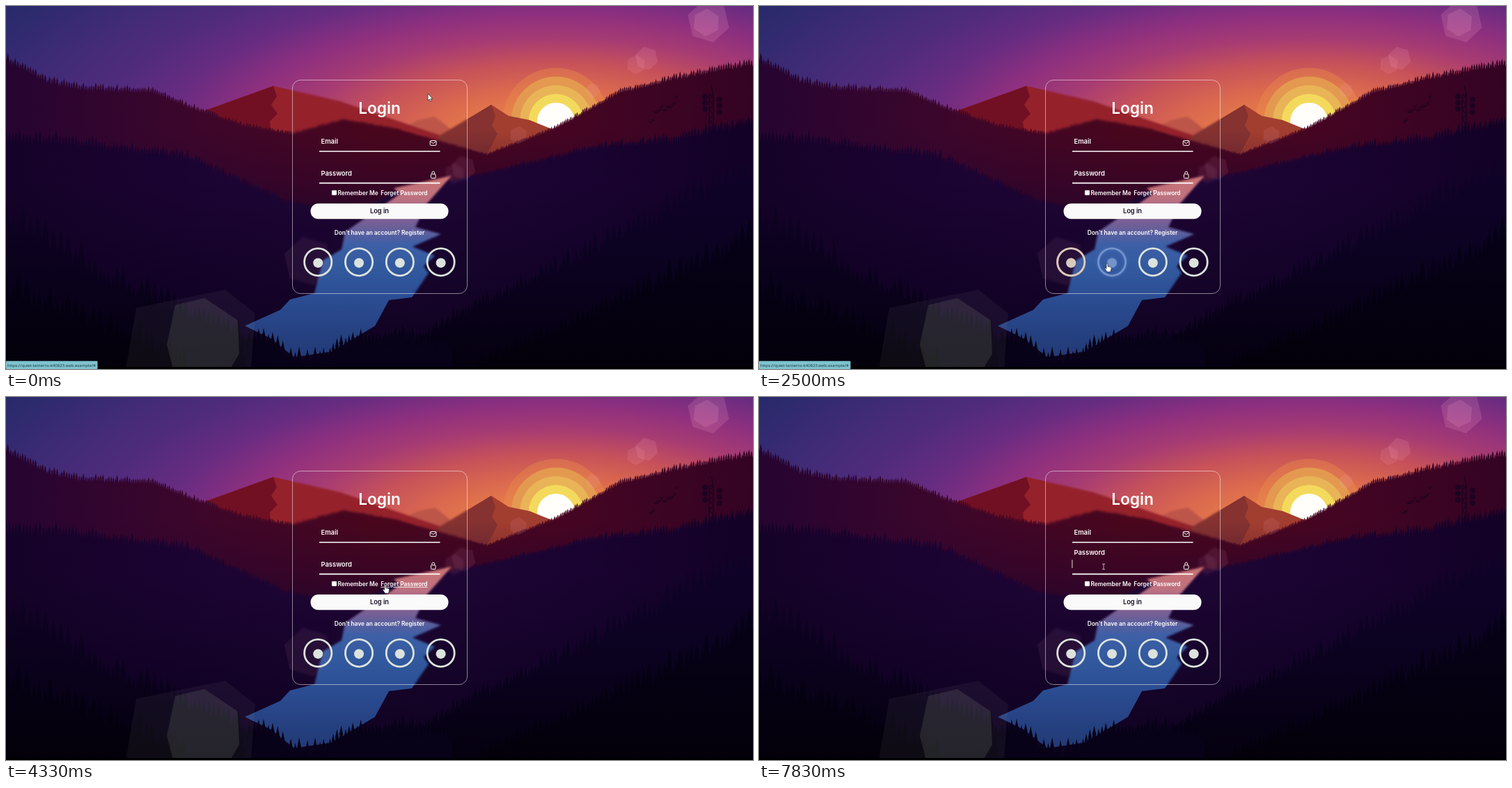
An HTML page with a canvas that plays this animation: 1073x522 px, repeating every 8000 ms.

```html
<!DOCTYPE html>
<html lang="en">
<head>
<meta charset="utf-8">
<title>Login</title>
<style>
  html, body { margin: 0; width: 100%; height: 100%; overflow: hidden; background: #05010f; }
  canvas, svg, #card { position: absolute; left: 0; top: 0; }
  #card {
    left: 410.5px; top: 106px; width: 250px; height: 306px;
    border: 1px solid rgba(255, 255, 255, .5); border-radius: 12px;
    backdrop-filter: blur(1.5px);
  }
  text { font-family: Inter, "Open Sans", sans-serif; font-weight: 600; fill: #fff; }
  .label { font-size: 9.4px; }
  .small { font-size: 8.3px; }
  .line { fill: none; stroke: #fff; }
</style>
</head>
<body>
<canvas id="scene" width="1073" height="522"></canvas>
<div id="card"></div>
<svg width="1073" height="522" viewBox="0 0 1073 522">
  <text x="536.5" y="155" font-size="22.7" text-anchor="middle">Login</text>

  <text id="email" class="label" x="452.5" y="198">Email</text>
  <text id="password" class="label" x="452.5" y="243.7">Password</text>
  <path class="line" stroke-width="1.6" d="M450 209H623.5M450 254.6H623.5"/>
  <rect class="line" x="609.2" y="193.6" width="8.8" height="6.8" rx="1"/>
  <path class="line" d="M609.6 194.6l4 3 4-3"/>
  <rect class="line" x="610.4" y="241.8" width="6.6" height="5.8" rx="1"/>
  <path class="line" d="M611.8 241.5v-1.6a1.9 1.9 0 0 1 3.8 0v1.6"/>
  <path id="caret" class="line" style="stroke:#e5dfc4" d="M449.9 234v12"/>

  <rect x="468" y="265" width="7" height="7" rx="1" fill="#fff" stroke="#8a7f88" stroke-width=".5"/>
  <text class="small" x="476.5" y="272">Remember Me</text>
  <text id="forget" class="small" x="538.3" y="272">Forget Password</text>
  <rect x="437.5" y="284" width="198" height="22.3" rx="11.1" fill="#fafafa"/>
  <text x="536.5" y="298.3" font-size="9.2" text-anchor="middle" style="fill:#140b20">Log in</text>
  <text class="small" x="536.5" y="328.8" text-anchor="middle">Don't have an account? Register</text>

  <g id="icons"></g>

  <g id="status">
    <rect y="510.5" width="131.5" height="11.5" rx="1" fill="#7fc3cf"/>
    <text x="2" y="518.8" font-size="6" style="font-family:'Open Sans',sans-serif;font-weight:400;fill:#16323a">https://quiet-lanterns-k40823.web.example/#</text>
  </g>

  <g id="cursor">
    <path id="arrow" d="M0 0v10l2.3-2 1.5 3.4 1.6-.8-1.5-3.2h3z" fill="#fff" stroke="#222" stroke-width=".7"/>
    <path id="hand" d="M-1 .4q1-1 2 0v4.1l4 .8q1.4.4 1.2 1.8l-.7 3.2-.7 2H0l-3.2-4.6q-.2-1.5 1.2-1l1 1z" fill="#fff" stroke="#222" stroke-width=".7"/>
    <path id="beam" d="M-2-3.8h4M0-3.8v7.6M-2 3.8h4" fill="none" stroke="#c9bfc4" stroke-width=".9"/>
  </g>
</svg>
<script>
const byId = id => document.getElementById(id);
const ease = k => k * k * (3 - 2 * k);
const ctx = byId('scene').getContext('2d');
const W = 1073, H = 522;

let seed = 7;
const random = () => (seed = seed * 16807 % 2147483647) / 2147483647;

// Interpolates rows by their first value, holding the ends.
function along(rows, key, curve = k => k) {
  let i = 1;
  while (i < rows.length - 1 && rows[i][0] < key) i++;
  const a = rows[i - 1], b = rows[i];
  const k = curve(Math.max(0, Math.min(1, (key - a[0]) / (b[0] - a[0]))));
  return a.map((v, n) => v + (b[n] - v) * k);
}

// Evenly spaced colours along a gradient.
function blend(g, colors) {
  colors.forEach((color, i) => g.addColorStop(i / (colors.length - 1), color));
  return g;
}
const across = (...colors) => blend(ctx.createLinearGradient(0, 0, W, 0), colors);
const down = (y0, y1, ...colors) => blend(ctx.createLinearGradient(0, y0, 0, y1), colors);

function polygon(fill, points) {
  ctx.beginPath();
  points.forEach(([x, y]) => ctx.lineTo(x, y));
  ctx.fillStyle = fill;
  ctx.fill();
}

function disc(x, y, r, fill) {
  ctx.beginPath();
  ctx.arc(x, y, r, 0, 7);
  ctx.fillStyle = fill;
  ctx.fill();
}

function hexagon(x, y, r, fill, turn) {
  polygon(fill, Array.from({ length: 6 }, (_, i) => {
    const a = turn + i * Math.PI / 3;
    return [x + r * Math.cos(a), y + r * Math.sin(a)];
  }));
}

// A hillside of spruces that grow taller away from the middle of the valley.
function ridge(fill, near, far, crest) {
  const from = crest[0][0], to = crest[crest.length - 1][0];
  polygon(fill, [[from, H], ...crest, [to, H]]);
  for (let x = from; x < to;) {
    const y = along(crest, x)[1];
    const h = (near + (far - near) * Math.abs(x - 590) / 590) * (.45 + .55 * random());
    const w = 1 + h * .17;
    const side = s => [[x + s * w * .5, y - h * .5], [x + s * w * .35, y - h * .5], [x + s * w, y + 3]];
    polygon(fill, [[x, y - h], ...side(1), ...side(-1).reverse()]);
    x += w * 1.15;
  }
}

function drawSky() {
  ctx.save();
  ctx.translate(789, 190);
  ctx.scale(2.6, 1);
  ctx.fillStyle = blend(ctx.createRadialGradient(0, 0, 0, 0, 0, 360),
    ['#ee8e48', '#e87f49', '#db6a4e', '#c75259', '#a63b73', '#8d2f7f', '#672c81', '#512b7d', '#432b78', '#342a71', '#262a6a']);
  ctx.fillRect(-400, -200, 800, 500);
  ctx.restore();
  ['rgba(232,140,74,.4)', '#e39a50', '#e9b457', '#f4da5c', '#fffefb']
    .forEach((color, i) => disc(790, 166, 77 - i * 12.5, color));
}

function drawMountains() {
  polygon('#bd5549', [[560, 180], [592, 164], [616, 159], [668, 200]]);
  polygon('#95212b', [[270, 156], [384, 115], [480, 137], [650, 195], [640, 230], [270, 230]]);
  polygon('#711023', [[270, 156], [384, 115], [389, 130], [381, 142], [390, 155], [379, 166], [385, 230], [270, 230]]);
  polygon('#a23e2f', [[625, 187], [697, 142], [722, 158], [752, 164], [784, 177], [822, 162], [850, 230], [625, 230]]);
  polygon('#853230', [[620, 188], [697, 142], [703, 158], [698, 172], [706, 184], [690, 215], [620, 215]]);
}

function drawTower() {
  const ink = '#1d0320';
  ctx.strokeStyle = ink;
  ctx.lineWidth = 1.6;
  ctx.strokeRect(1010, 128, 6, 80);
  ctx.beginPath();
  ctx.moveTo(1013, 114);
  for (let i = 0; i < 12; i++) ctx.lineTo(i % 2 ? 1010 : 1016, 128 + i * 7);
  ctx.stroke();
  for (let i = 0; i < 6; i++) disc(i % 2 ? 1025 : 1004, 130 + i * 4.5, 4, ink);
  for (let i = 0; i < 13; i++) {
    const x = 926 + i * 3.1, y = 161 - i * 2.4 + random() * 12 - 4;
    polygon(ink, [[x - 4, y - 2], [x, y], [x + 3, y - 4], [x + 1, y + 2]]);
  }
}

// Hexagons strung along the line from the top right corner through the sun's glow.
function drawFlares() {
  [[1009, 31], [1006, 20], [920, 17], [905, 14], [843, 11], [736, 13], [657, 18], [644, 15], [434, 36]]
    .forEach(([x, r], i) => hexagon(x, 22 + (1009 - x) * .6, r, `rgba(255,170,200,${.17 - i * .013})`, .3 + i % 2 * .3));
  polygon('rgba(190,180,190,.06)', [[172, 522], [187, 434], [315, 408], [358, 442], [352, 522]]);
  polygon('rgba(190,210,170,.12)', [[231, 487], [243, 430], [285, 420], [333, 452], [335, 500], [322, 522], [240, 522]]);
}

function drawRiver() {
  polygon(down(244, 506, '#cb7372', '#bd7180', '#7a5f94', '#3d5fa6', '#325a9f', '#2d5096', '#29488c', '#25407f', '#223a76'), [
    [640, 244], [557, 262], [566, 270], [487, 325], [482, 350], [455, 366], [443, 413], [408, 422], [394, 437],
    [343, 460], [380, 478], [414, 505], [468, 497], [530, 460], [550, 423], [583, 419], [607, 384], [600, 374],
    [616, 359], [584, 346], [625, 328], [588, 318], [604, 285]]);
}

function drawScene() {
  drawSky();
  drawMountains();
  ridge(across('#260431', '#3c062b', '#49061c', '#450522', '#340324'), 2, 17, [
    [0, 82], [60, 113], [100, 122], [210, 126], [270, 150], [340, 174], [412, 186], [485, 165], [560, 177],
    [690, 215], [790, 177], [880, 127], [960, 107], [1073, 87]]);
  drawTower();
  ctx.fillStyle = down(180, 300, 'rgba(34,3,48,0)', 'rgba(34,3,48,.65)');
  ctx.fillRect(0, 180, W, H);
  ridge(across('#150228', '#1b0332', '#200636', '#1a0331', '#130126'), 3, 27, [
    [0, 199], [100, 204], [260, 222], [400, 284], [500, 302], [560, 268], [690, 243], [850, 207], [960, 198], [1073, 172]]);
  ctx.fillStyle = down(250, H, 'rgba(5,0,20,0)', 'rgba(5,0,20,.65)');
  ctx.fillRect(0, 250, W, H);
  drawRiver();

  ridge(down(260, H, '#100224', '#0a021c', '#05000f'), 18, 62, [[0, 325], [110, 390], [230, 445], [335, 482], [375, 522]]);
  ridge(down(220, H, '#10022a', '#0b0220', '#05000f'), 18, 65, [[550, 510], [650, 452], [800, 385], [900, 335], [1073, 255]]);
  ridge(down(340, H, '#070118', '#03000a'), 14, 60, [[0, 430], [150, 480], [260, 522]]);
  ridge(down(310, H, '#070118', '#03000a'), 14, 65, [[680, 522], [850, 455], [1073, 350]]);
  ridge('#070217', 26, 44, [[344, 500], [372, 492], [412, 520], [440, 522], [490, 495], [580, 482], [640, 500]]);

  drawFlares();
  ctx.fillStyle = '#000';
  ctx.fillRect(0, 519, W, 3);
}
drawScene();

const FRAMES = 48, FRAME_RATE = 6 / 1000;

// Pointer stops: step, x, y.
const stops = [
  [0, 606, 126], [4, 607, 17], [6, 607, 8], [12, 455, 368], [15, 500, 370], [19, 636, 374], [21, 636, 374],
  [26, 544.5, 270], [32, 515, 235], [36, 511, 199], [42, 495, 244]];
const clicks = [[30, 'password'], [35, 'email'], [45, 'password']];

const pointer = step => along(stops, step, ease).slice(1);
const lastClick = step => clicks.filter(([at]) => at <= step).pop() || [0, ''];

// Every transition takes three steps: the share of them for which the state held.
const transition = (step, holds) => ease([0, 1, 2].filter(back => holds(step - back)).length / 3);

function within(step, left, top, right, bottom) {
  const [x, y] = pointer(step);
  return x >= left && x <= right && y >= top && y <= bottom;
}
const overForget = step => within(step, 538, 262, 606, 276);
const overInput = step => within(step, 450, 185, 624, 210) || within(step, 450, 228, 624, 256);

const buttons = ['#c9805f', '#4a72c4', '#4aa6e8', '#b53f90'].map((color, i) => {
  const x = 448.2 + i * 58.8;
  const node = document.createElementNS(byId('icons').namespaceURI, 'g');
  node.innerHTML = `<circle cx="${x}" cy="368.2" r="19.6" fill="none" stroke="currentColor" stroke-width="2.8"/>
    <circle cx="${x}" cy="369.4" r="7" fill="currentColor"/>`;
  byId('icons').append(node);
  return { node, color, hovered: step => within(step, x - 21, 347, x + 21, 389) };
});
const overButton = step => buttons.some(b => b.hovered(step));

const show = (id, on) => byId(id).style.display = on ? '' : 'none';

function draw(step) {
  byId('cursor').setAttribute('transform', `translate(${pointer(step)})`);
  const hand = overButton(step) || overForget(step), beam = overInput(step);
  show('hand', hand);
  show('beam', beam);
  show('arrow', !hand && !beam);

  for (const { node, color, hovered } of buttons) {
    const k = transition(step, hovered);
    node.style.color = `color-mix(in srgb, ${color} ${k * 95}%, #dce3dd)`;
    node.style.filter = k ? `drop-shadow(0 0 ${k * 3}px ${color})` : 'none';
  }

  byId('status').style.opacity = step === 0 ? 1 : transition(step, overButton);
  byId('forget').style.textDecoration = overForget(step) ? 'underline' : 'none';

  for (const field of ['email', 'password']) {
    const lift = transition(step, s => lastClick(s)[1] === field);
    byId(field).setAttribute('transform', `translate(0 ${-16.7 * lift})`);
  }
  const [clicked, focus] = lastClick(step);
  show('caret', focus && (step - clicked) % 6 < 3);
  byId('caret').setAttribute('transform', `translate(0 ${focus === 'email' ? -45.6 : 0})`);
}

const start = performance.now();
function tick() {
  draw(Math.floor((performance.now() - start + 4) * FRAME_RATE) % FRAMES);
  requestAnimationFrame(tick);
}
tick();
</script>
</body>
</html>
```
